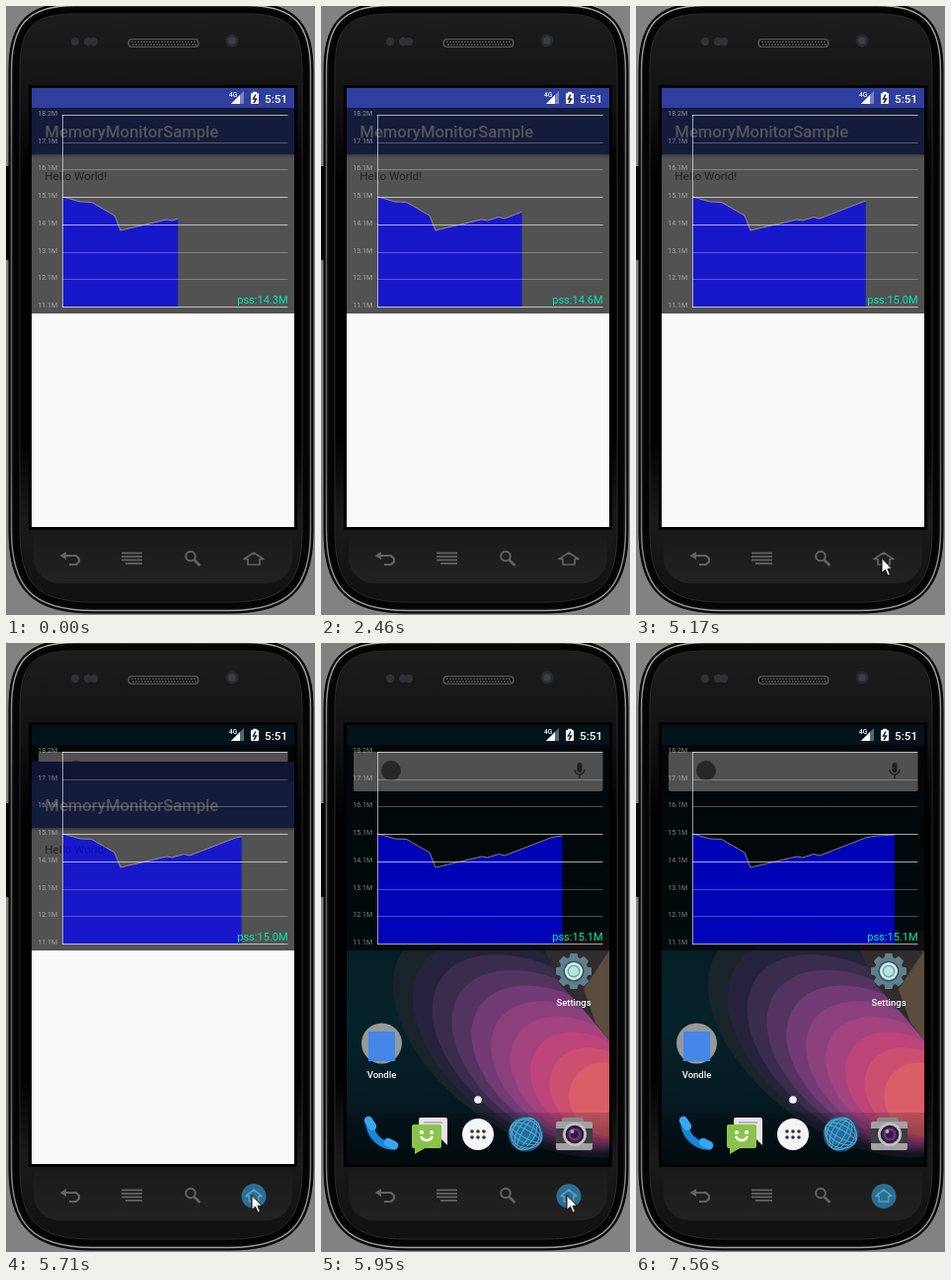
An HTML page with a canvas for the animation above (7.99 s loop, 313 by 616 pixels).

```html
<!DOCTYPE html>
<html lang="en">
<head>
<meta charset="utf-8">
<title>Memory monitor</title>
<style>
html, body { margin: 0; width: 100%; height: 100%; overflow: hidden; background: #828282; }
canvas { display: block; width: 313px; height: 616px; }
</style>
</head>
<body>
<canvas id="stage" width="313" height="616"></canvas>
<script>
const ctx = document.getElementById('stage').getContext('2d');
const TAU = Math.PI * 2;
const LOOP = 7990, PRESS = 5440, SLIDE = 5710, FADE = 5830, HOME = 5950;
const SHIFT = 37;
const POINTER = { from: 4480, to: 7280 };

// Key points: sample index and height, time and pointer tip.
const memory = [[0, 193], [3, 198], [5, 198.5], [9, 212], [10, 227], [18, 216], [19, 217],
  [21, 213.5], [22, 215], [30, 197], [31, 195.8], [32, 195], [35, 194]];
const tip = {
  x: [[4480, 257], [4750, 243], [5020, 243], [5170, 248.5]],
  y: [[4480, 602], [4750, 566], [5020, 562], [5170, 558]]
};
const AXIS = { left: 57, right: 285.5, top: 110.4, gap: 27.72, max: 18.2, min: 11.1, step: 5.84 };

// Linear interpolation through key points, held after the last one.
function along(keys, p) {
  const i = keys.findIndex(k => k[0] > p);
  if (i < 0) return keys[keys.length - 1][1];
  if (i === 0) return keys[0][1];
  const [a, va] = keys[i - 1], [b, vb] = keys[i];
  return va + (vb - va) * (p - a) / (b - a);
}
const lerp = (a, b, p) => a + (b - a) * p;

function rect(x, y, w, h, color) {
  ctx.fillStyle = color;
  ctx.fillRect(x, y, w, h);
}
function round(x, y, w, h, r, color) {
  ctx.beginPath();
  ctx.roundRect(x, y, w, h, r);
  ctx.fillStyle = color;
  ctx.fill();
}
function oval(x, y, rx, ry, turn, color) {
  ctx.beginPath();
  ctx.ellipse(x, y, rx, ry, turn, 0, TAU);
  ctx.fillStyle = color;
  ctx.fill();
}
const disc = (x, y, r, color) => oval(x, y, r, r, 0, color);
function trace(points, close) {
  ctx.beginPath();
  points.forEach(([x, y]) => ctx.lineTo(x, y));
  if (close) ctx.closePath();
}
function line(points, color, width, close) {
  trace(points, close);
  ctx.strokeStyle = color;
  ctx.lineWidth = width;
  ctx.stroke();
}
function poly(points, color) {
  trace(points, true);
  ctx.fillStyle = color;
  ctx.fill();
}
function arc(x, y, r, a, b, color, width) {
  ctx.beginPath();
  ctx.arc(x, y, r, a, b);
  ctx.strokeStyle = color;
  ctx.lineWidth = width;
  ctx.stroke();
}
function text(str, x, y, size, color, weight = 400, align = 'left') {
  ctx.font = `${weight} ${size}px Roboto, sans-serif`;
  ctx.textAlign = align;
  ctx.fillStyle = color;
  ctx.fillText(str, x, y);
}
function ramp(y0, y1, ...colors) {
  const g = ctx.createLinearGradient(0, y0, 0, y1);
  colors.forEach((c, i) => g.addColorStop(i / (colors.length - 1), c));
  return g;
}

// Phone outline, inset by d.
function shell(d, fill, stroke, width = 1) {
  const l = 3 + d, r = 311 - d, t = d - 3, b = 614 - d, k = d / 2;
  ctx.beginPath();
  ctx.moveTo(l, 66);
  ctx.bezierCurveTo(l, 18 + k, 20 + k, t, 70, t);
  ctx.lineTo(244, t);
  ctx.bezierCurveTo(294 - k, t, r, 18 + k, r, 66);
  ctx.lineTo(r, 530);
  ctx.bezierCurveTo(r, 588 - k, 290 - k, b, 226, b);
  ctx.lineTo(88, b);
  ctx.bezierCurveTo(24 + k, b, l, 588 - k, l, 530);
  ctx.closePath();
  if (fill) { ctx.fillStyle = fill; ctx.fill(); }
  if (stroke) { ctx.strokeStyle = stroke; ctx.lineWidth = width; ctx.stroke(); }
}

function phone() {
  rect(0, 0, 313, 616, '#828282');
  round(-3, 162, 8, 95, 2, '#080808');
  shell(0, '#0a0a0a', '#000');
  shell(2.5, null, ramp(0, 616, '#b0b0b0', '#666', '#666', '#666', '#a0a0a0'), 1.4);
  shell(5, '#040404');
  shell(11, ramp(8, 606, '#1d1d1d', '#121212', '#000', '#000', '#000', '#000', '#1a1a1a', '#101010'), '#292929');
  rect(23, 80, 272, 450, '#000');
  round(28, 534, 262, 50, [3, 3, 26, 26], ramp(534, 584, '#1a1a1a', '#222'));

  for (const x of [70, 83, 89]) disc(x, 36, 4.2, '#303036');
  disc(229, 35, 6.5, '#292a2d');
  disc(229, 35, 3.8, '#3b3e45');
  round(123.5, 33, 72, 9, 4, '#565656');
  round(125, 34.2, 69, 6.6, 3, '#111');
  for (let x = 127; x < 193; x += 3) {
    rect(x, 35.5, 1.8, 1.6, '#555');
    rect(x + 1, 38.2, 1.8, 1.6, '#555');
  }
}

function keys(lit) {
  const c = '#626262';
  ctx.lineJoin = 'round';
  line([[59, 556], [71, 556], [74, 559], [74, 562], [71, 565], [64, 565]], c, 2.2);
  poly([[54.5, 556], [61, 552], [61, 560]], c);
  for (let i = 0; i < 4; i++) rect(i < 3 ? 117 : 121, 552.5 + i * 3.5, i < 3 ? 21 : 17, 1.8, c);
  arc(187, 556.5, 4.8, 0, TAU, c, 2);
  line([[190.6, 560.2], [196.5, 566]], c, 2.6);

  if (lit) disc(251, 559.5, 12.5, '#2c6f93');
  ctx.save();
  ctx.translate(251, 559.5);
  if (lit) ctx.scale(0.8, 1);
  line([[-10, 0], [0, -6.5], [10, 0], [6, 0], [6, 5.5], [-6, 5.5], [-6, 0]], lit ? '#58a0c6' : c, 1.7, true);
  ctx.restore();
  ctx.lineJoin = 'miter';
}

function wallpaper() {
  rect(26, 83, 266, 444, ramp(83, 527, '#02131a', '#031920', '#06222a', '#03141b'));
  const lobes = 9;
  for (let i = 0; i <= lobes; i++) {
    const p = i / lobes;
    const color = `hsl(${205 + 150 * p ** 0.6} ${26 + 36 * p * p}% ${13 + 48 * p}%)`;
    oval(lerp(212, 290, p), lerp(402, 462, p), lerp(158, 40, p), lerp(92, 36, p), 0.62, color);
  }
  poly([[292, 290], [222, 300], [242, 345], [272, 378], [292, 402]], '#302b2d');
  poly([[292, 311], [266, 350], [278, 384], [292, 402]], '#5a4c3e');
  rect(26, 475, 266, 52, ramp(475, 527, 'rgba(0,0,0,.15)', 'rgba(0,0,0,.5)'));
}

function gear(x, y) {
  ctx.save();
  ctx.translate(x, y);
  for (let i = 0; i < 8; i++) {
    poly([[-5, -12], [-3.5, -18], [3.5, -18], [5, -12]], '#60818f');
    ctx.rotate(TAU / 8);
  }
  disc(0, 0, 14.5, '#607d8b');
  disc(0, 0, 10.5, '#34505b');
  disc(0, 0, 9, '#d9f1ed');
  disc(0, 0, 6.5, '#64a5a8');
  disc(0, 0, 5, '#b9e4df');
  ctx.restore();
}

function handset() {
  ctx.lineCap = 'round';
  arc(74, 484, 25, Math.PI / 2, Math.PI, '#1687d9', 7.5);
  line([[48, 483], [52, 489]], '#35a8f0', 8.5);
  line([[68, 505], [74, 508]], '#35a8f0', 8.5);
  ctx.lineCap = 'butt';
}

function bubbles() {
  round(99, 480, 29, 22, 2, '#e6e3ea');
  poly([[120, 500], [128, 500], [128, 508]], '#e6e3ea');
  rect(104, 484, 19, 2, '#b8b2bd');
  round(92, 487, 30, 24, 2, '#8bc34a');
  poly([[95, 510], [107, 510], [95, 517]], '#8bc34a');
  disc(102, 495, 2, '#fff');
  disc(112, 495, 2, '#fff');
  arc(107, 497, 6, 0.3, Math.PI - 0.3, '#fff', 2.5);
}

function globe(x, y) {
  disc(x, y, 18, '#164f78');
  disc(x - 2, y - 3, 14, '#2071a0');
  ctx.lineWidth = 1;
  ctx.strokeStyle = '#62a9cd';
  for (let i = 0; i < 6; i++) {
    ctx.beginPath();
    ctx.ellipse(x, y, 17, 4 + (i >> 1) * 5, 0.5 + (i % 2) * TAU / 4, 0, TAU);
    ctx.stroke();
  }
}

function camera() {
  round(244, 480, 22, 9, 2, '#88878a');
  round(238, 484, 37, 29, 2, '#a3a0a3');
  rect(238, 491, 37, 15, '#3e3b42');
  ['#c4c0c5', '#29202e', '#653779', '#36164a'].forEach((c, i) => disc(257, 497, 12 - i * 2.7, c));
  disc(254.5, 494, 2, '#c598d6');
}

function home() {
  wallpaper();
  round(33, 110, 252.5, 40, 2, '#f4f4f4');
  disc(71, 129, 10, '#777');
  round(259.5, 121, 5, 10, 2.5, '#666');
  arc(262, 128, 5, 0, Math.PI, '#666', 1.6);
  rect(261.2, 133, 1.6, 4, '#666');

  gear(256, 332);
  text('Settings', 256, 367, 9.5, '#fff', 500, 'center');
  disc(61.5, 405, 20.5, '#96999a');
  rect(48, 393, 27, 30, '#4487e8');
  text('Vondle', 61.5, 440, 9.5, '#fff', 500, 'center');
  disc(159, 462, 3.8, '#f2f2f2');
  handset();
  bubbles();
  disc(159, 497, 16, '#f5f5f5');
  for (let i = 0; i < 6; i++) disc(153 + (i % 3) * 6, 494 + Math.floor(i / 3) * 6, 1.8, '#333');
  globe(207.5, 496.5);
  camera();
}

function app(shift, alpha) {
  ctx.save();
  ctx.globalAlpha = alpha;
  ctx.translate(0, shift);
  rect(26, 83, 266, 444, '#fafafa');
  rect(26, 83, 266, 20, '#303f9f');
  rect(26, 103, 266, 47, '#3f51b5');
  rect(26, 150, 266, 4, ramp(150, 154, 'rgba(0,0,0,.3)', 'rgba(0,0,0,0)'));
  text('MemoryMonitorSample', 39.3, 132.5, 16.67, '#fff', 500);
  text('Hello World!', 39.3, 176, 11.67, '#666');
  ctx.restore();
}

function statusBar() {
  text('4G', 226, 92, 6.5, '#fff', 500);
  poly([[228, 99], [241, 99], [241, 86]], 'rgba(255,255,255,.35)');
  poly([[228, 99], [237, 99], [237, 90]], '#fff');
  round(248, 88, 8, 11, 1, '#fff');
  rect(250, 86.8, 4, 2, '#fff');
  line([[253, 89.5], [250.5, 94], [253.5, 94], [251, 98]], '#223', 1.5);
  text('5:51', 285, 97.5, 11.67, '#fff', 500, 'right');
}

function graph(count) {
  const { left, right, top, gap, max, min, step } = AXIS;
  const bottom = top + 7 * gap;
  const points = Array.from({ length: count + 1 }, (_, i) => [left + 0.5 + i * step, along(memory, i)]);
  const [edge, last] = points[count];
  poly([...points, [edge, 304], [left + 0.5, 304]], 'rgba(0,0,255,.7)');
  line(points, 'rgba(190,185,145,.75)', 0.9);
  for (let i = 0; i < 8; i++) {
    const y = Math.floor(top + i * gap);
    const value = Math.floor((max - i * (max - min) / 7) * 10 + 0.001) / 10;
    const bright = i % 7 === 0 || i === 3 || i === 4;
    rect(left, y, right - left, 1, `rgba(255,255,255,${bright ? 0.64 : 0.28})`);
    text(value.toFixed(1) + 'M', 52, y + 0.5, 7, 'rgba(255,255,255,.5)', 400, 'right');
  }
  rect(left, 110, 1, 195, 'rgba(255,255,255,.6)');
  const used = min + 0.03 + (bottom - 0.4 - last) / gap;
  text(`pss:${used.toFixed(1)}M`, 285.5, 301, 11, '#00ebaa', 400, 'right');
}

function arrow(x, y) {
  ctx.save();
  ctx.translate(x, y);
  const shape = [[0.5, 0.5], [0.5, 15.5], [4, 12.2], [6.6, 18.3], [9, 17.2], [6.5, 11.3], [11, 11.3]];
  poly(shape, '#fff');
  line(shape, '#000', 1, true);
  ctx.restore();
}

function draw(t) {
  phone();
  keys(t >= PRESS);
  ctx.save();
  ctx.beginPath();
  ctx.rect(26, 83, 266, 444);
  ctx.clip();
  if (t >= SLIDE) home();
  if (t < HOME) app(t < SLIDE ? 0 : SHIFT, t < FADE ? 1 : 0.4);
  rect(26, 103, 266, 208, 'rgba(0,0,0,.67)');
  statusBar();
  graph(20 + Math.floor((t + 50) / 500)); // one sample every half second
  ctx.restore();
  if (t >= POINTER.from && t < POINTER.to) arrow(along(tip.x, t), along(tip.y, t));
}

const start = performance.now();
function frame() {
  draw((performance.now() - start) % LOOP);
  requestAnimationFrame(frame);
}
frame();
</script>
</body>
</html>
```
